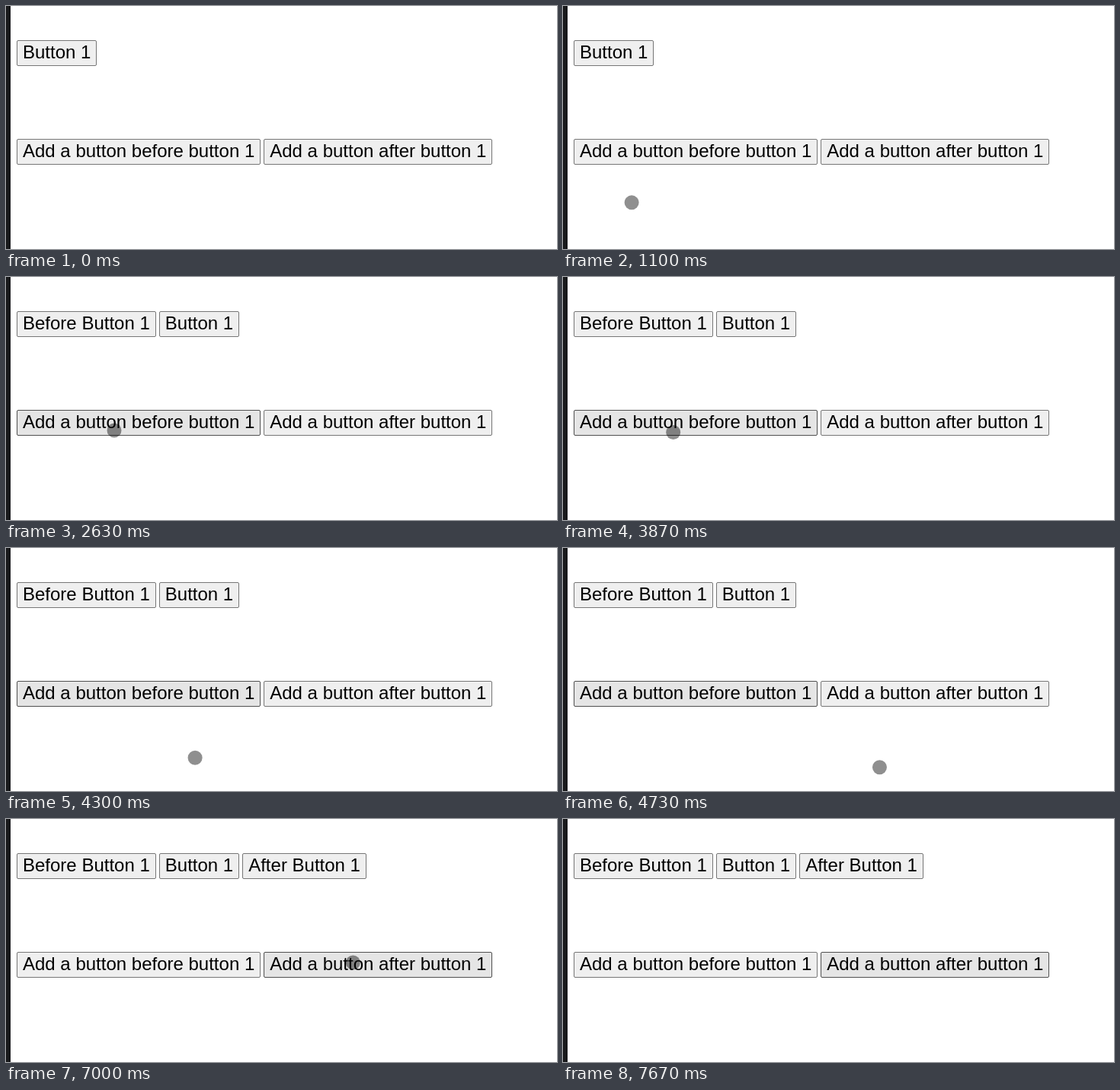
An HTML page for the animation above (9530 ms loop, 723 by 320 pixels).

```html
<!DOCTYPE html>
<html lang="en">
<head>
<meta charset="utf-8">
<title>Insert buttons before and after</title>
<style>
  html, body { margin: 0; width: 100%; height: 100%; overflow: hidden; background: #fff; }
  #edge { position: absolute; left: 0; top: 0; width: 6px; height: 100%; background: #18191b; }
  .row { position: absolute; left: 14px; display: flex; gap: 4px; }
  .button {
    box-sizing: border-box; height: 34px; padding: 0 7px;
    border: 1px solid #767676; border-radius: 2px; background: #efefef; color: #000;
    font: 24px/29px "Liberation Sans", Arial, sans-serif; white-space: nowrap;
  }
  .hover { background: #e5e5e5; border-color: #4f4f4f; }
  .active { background: #f5f5f5; border-color: #8d8d8d; }
  #pointer {
    position: absolute; left: -9.5px; top: -9.5px; width: 19px; height: 19px;
    border-radius: 50%; background: rgba(0, 0, 0, .44);
  }
</style>
</head>
<body>
<div id="edge"></div>
<div class="row" style="top:45px">
  <div class="button" id="before">Before Button 1</div>
  <div class="button">Button 1</div>
  <div class="button" id="after">After Button 1</div>
</div>
<div class="row" style="top:175px">
  <div class="button" id="addBefore">Add a button before button 1</div>
  <div class="button" id="addAfter">Add a button after button 1</div>
</div>
<div id="pointer"></div>
<script>
const LOOP = 9530, FIRST_PRESS = 2430, SECOND_PRESS = 6100;
const $ = id => document.getElementById(id);
const point = (x, y) => ({ x, y });
const easeIn = u => u ** 1.5;
const easeOut = u => 1 - (1 - u) ** 2;

const onFirst = point(141.5, 201.5);
const below = point(432.5, 281.5);
const onSecond = point(493.5, 195.5);
const resting = point(458.5, 189.5);

// Each move is a curve bent towards one point; the pointer then waits until `leave`.
const move = (start, end, leave, ease, from, bend, to) => ({ start, end, leave, ease, from, bend, to });
const moves = [
  move(400, 500, 500, easeOut, point(10, 4), point(31, 25), point(0, 14)),
  move(670, 1600, 3830, easeOut, point(0, 314), point(44, 317), onFirst),
  move(3830, 4770, 4800, easeIn, onFirst, point(294, 342), below),
  move(4800, 5200, 6730, easeOut, below, point(480, 220), onSecond),
  move(6730, 7100, 7430, easeOut, onSecond, point(430, 182), resting),
  move(7430, 7670, 7670, easeIn, resting, point(226, 68), point(-6, -53))
];

function pointerAt({ start, end, ease, from, bend, to }, t) {
  const e = ease(Math.min(1, (t - start) / (end - start))), r = 1 - e;
  const curve = axis => r * r * from[axis] + 2 * r * e * bend[axis] + e * e * to[axis];
  return point(curve("x"), curve("y"));
}

function pressState(t, press, release, blur) {
  if (t < press || t >= blur) return "button";
  return t < release ? "button active" : "button hover";
}

function draw(now) {
  // Motion advances at 30 steps per second, timed in whole centiseconds.
  const step = Math.floor((now % LOOP) * 0.03 + 0.15);
  const t = Math.round(step * 10 / 3) * 10;

  $("before").style.display = t >= FIRST_PRESS ? "" : "none";
  $("after").style.display = t >= SECOND_PRESS ? "" : "none";
  $("addBefore").className = pressState(t, FIRST_PRESS, FIRST_PRESS + 200, SECOND_PRESS);
  $("addAfter").className = pressState(t, SECOND_PRESS, SECOND_PRESS + 130, LOOP);

  const current = moves.find(m => t >= m.start && t < m.leave);
  const pointer = $("pointer");
  pointer.style.display = current ? "" : "none";
  if (current) {
    const { x, y } = pointerAt(current, t);
    pointer.style.transform = `translate(${x}px, ${y}px)`;
  }
}

const start = performance.now();
function tick() {
  draw(performance.now() - start);
  requestAnimationFrame(tick);
}
tick();
</script>
</body>
</html>
```
